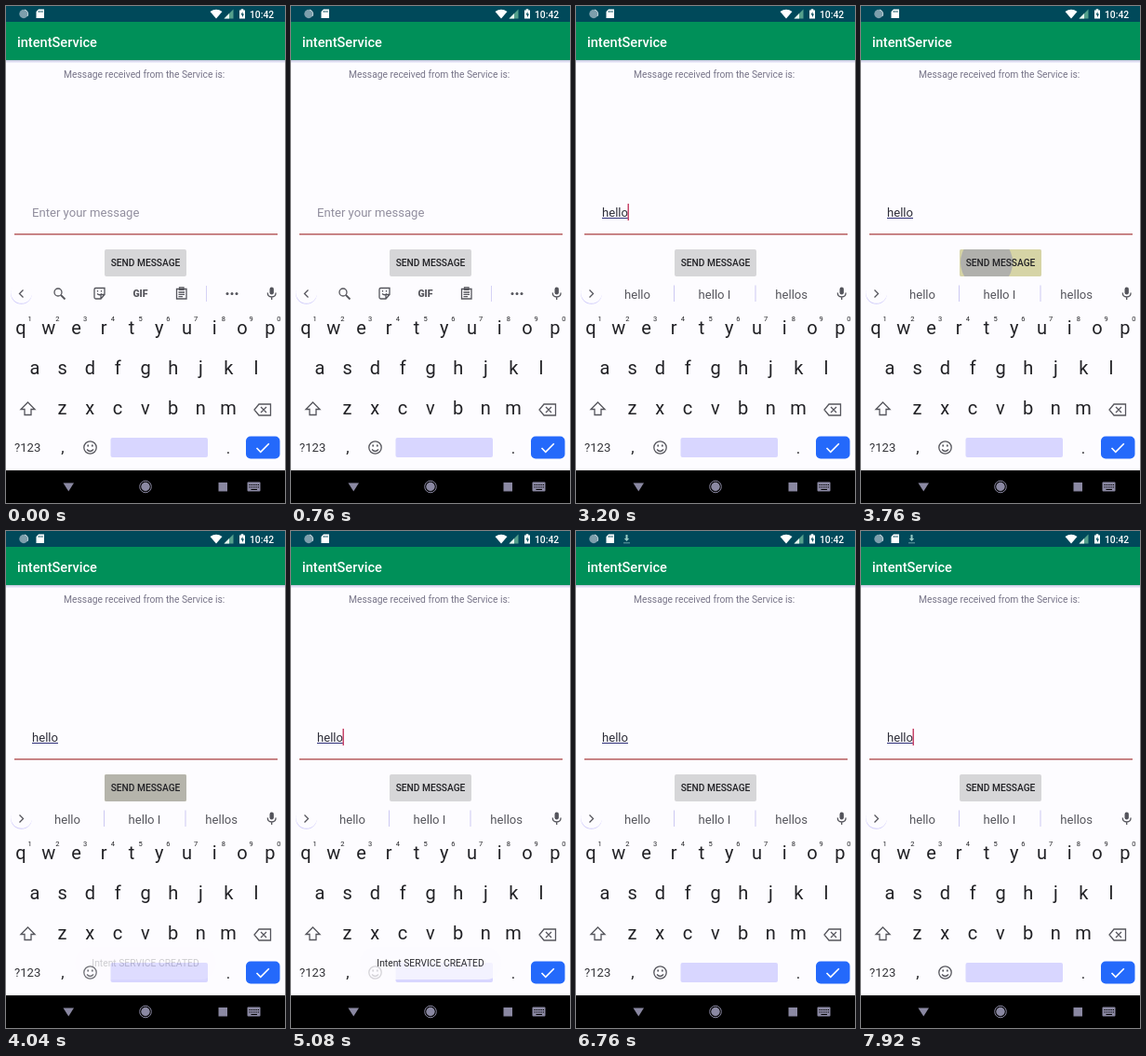
An HTML page that plays this animation: 300 px wide and 533 px high, repeating every 8000 ms.

```html
<!DOCTYPE html>
<html lang="en">
<head>
<meta charset="utf-8">
<title>Intent service demo</title>
<style>
html, body { margin: 0; width: 100%; height: 100%; overflow: hidden; background: #fdfcff; }
svg { display: block; width: 300px; height: 533px; font-family: Roboto, sans-serif; }
.mid { text-anchor: middle; }
.medium { font-weight: 500; }
.line { fill: none; stroke: #55555c; stroke-width: 1.3; }
.solid { fill: #55555c; }
.nav { fill: #8a88a2; }
</style>
</head>
<body>
<svg viewBox="0 0 300 533">
  <defs>
    <clipPath id="buttonClip"><rect x="106" y="261" width="88" height="29" rx="2"/></clipPath>
    <linearGradient id="shade" x2="0" y2="1">
      <stop stop-color="#c4c6de"/><stop offset="1" stop-color="#f4f3ff"/>
    </linearGradient>
  </defs>
  <rect width="300" height="533" fill="#fdfcff"/>

  <!-- status bar -->
  <rect width="300" height="17" fill="#00495a"/>
  <circle cx="19" cy="8.5" r="4.7" fill="#7d9fac"/>
  <path d="M20 4a4.7 4.7 0 0 1 3 7" fill="none" stroke="#c5d6dc"/>
  <path d="M35 3.500h6v9.500h-8.500v-7z" fill="#fff"/>
  <path d="M35.500 5v2m1.800-2v2m1.800-2v2" stroke="#00495a" stroke-width=".8"/>
  <path d="M219.500 6q6.500-4.500 13 0l-6.500 7.500z" fill="#fff"/>
  <path d="M244.500 3.500v10h-10z" fill="#55a08c"/>
  <path d="M240 8v5.500h-5.500z" fill="#e8f4f0"/>
  <path d="M251 4.500h1.700v-1.200h2.600v1.200h1.700v9h-6z" fill="#fff"/>
  <path d="M254.500 6l-2 3.500h1.500v2.700l2-3.700h-1.500z" fill="#00495a"/>
  <text x="262" y="13" font-size="10.3" fill="#fff" class="medium">10:42</text>
  <g id="download" fill="#a9d8d0">
    <path id="arrow" d="M53.500 3h2v4h1.700l-2.700 3-2.700-3h1.700z"/>
    <path d="M51 12.300h7v1h-7z" opacity=".7"/>
  </g>

  <!-- app -->
  <rect y="17" width="300" height="41" fill="#009059"/>
  <rect y="58" width="300" height="3" fill="url(#shade)"/>
  <text x="12" y="44" font-size="14.6" fill="#fff" class="medium">intentService</text>
  <text x="148.700" y="77" font-size="10.3" fill="#777488" class="mid">Message received from the Service is:</text>
  <text id="hint" x="28" y="226" font-size="13.1" fill="#918e9e">Enter your message</text>
  <text id="typed" x="28" y="226" font-size="13.1" fill="#2d2d38"></text>
  <rect id="under" x="28" y="227" height="1" fill="#30307a"/>
  <rect id="cursor" y="212" width="1.500" height="18" fill="#c8456a"/>
  <rect x="9" y="244" width="283" height="1.500" fill="#b85f60"/>
  <g clip-path="url(#buttonClip)">
    <rect x="106" y="261" width="88" height="29" fill="#d6d6d8"/>
    <rect id="press" x="106" y="261" width="88" height="29" fill="#d6d4a6"/>
    <circle id="ripple" cy="275" fill="#b0b0ac"/>
  </g>
  <text x="150" y="279" font-size="10.2" fill="#222226" class="mid medium">SEND MESSAGE</text>

  <!-- strip above the keys -->
  <circle cx="16.500" cy="308.500" r="11.300" fill="#d0ccfa"/>
  <circle cx="16.700" cy="307.300" r="11.500" fill="#fdfcff"/>
  <path id="chevron" class="line"/>
  <g id="tools">
    <g class="line">
      <circle cx="56" cy="307" r="4"/><path d="M59 310l4.500 4.500" stroke-width="1.800"/>
      <path d="M96.500 302.500h9.500v7l-4 4.500h-5.500a1.500 1.500 0 0 1-1.500-1.500v-8.500a1.500 1.500 0 0 1 1.500-1.500zM106 309.500h-4v4.500M98 308.500q2.500 2.500 5 0M98.500 305v1.500m4-1.500v1.500"/>
      <path d="M183.500 303.500h10.500v10.500h-10.500zM186.500 301.800h4.500v2.500h-4.500zM185.500 307h6.500m-6.500 2.300h6.500m-6.500 2.300h4.500"/>
    </g>
    <text x="144.500" y="312" font-size="10.500" font-weight="900" class="mid solid">GIF</text>
    <path d="M215.500 300v17" stroke="#d5d2f5"/>
    <g class="solid"><circle cx="238" cy="308.500" r="1.500"/><circle cx="243" cy="308.500" r="1.500"/><circle cx="248" cy="308.500" r="1.500"/></g>
  </g>
  <g id="words" font-size="13.1" class="mid" fill="#55555c">
    <path d="M105.500 299.500v17.500M193 299.500v17.500" stroke="#cdc9f2"/>
    <text x="66" y="313.500"></text><text x="149" y="313.500"></text><text x="231.700" y="313.500"></text>
  </g>
  <rect x="283.500" y="301.500" width="4.400" height="8" rx="2.200" class="solid"/>
  <path d="M281.300 307.500q0 4.500 4.400 4.500t4.400-4.500M285.700 312v3" class="line"/>

  <!-- keyboard -->
  <g id="keys" class="mid" fill="#222226"></g>
  <path d="M23.500 425l7.500 7.500h-4v6h-7v-6h-4z" class="line"/>
  <path d="M272 427h12.500v12h-12.500l-5-6zM274 430l6 6m0-6l-6 6" class="line"/>
  <text x="9" y="478" font-size="13.100" fill="#333338">?123</text>
  <g class="line">
    <circle cx="90.500" cy="473.500" r="6.700"/>
    <path d="M87 475.500q3.500 4 7 0"/>
    <path d="M88.200 470.500v2m4.600-2v2" stroke-width="1.700"/>
  </g>
  <rect x="112.500" y="463" width="104.500" height="21" rx="2" fill="#d8d6ff"/>
  <rect x="258" y="461.500" width="36.500" height="24" rx="5" fill="#2469fb"/>
  <path d="M269.500 474l4.300 4.300 9-9" fill="none" stroke="#fff" stroke-width="1.600"/>

  <g id="toast">
    <rect x="74" y="446" width="152" height="35" rx="16" fill="#fdfcff" fill-opacity=".76"/>
    <text x="150" y="467" font-size="10.300" fill="#2c2c30" class="mid">Intent SERVICE CREATED</text>
  </g>

  <!-- navigation bar -->
  <rect y="498" width="300" height="35" fill="#000"/>
  <g class="nav">
    <path d="M61.500 511.500h11.500l-5.750 9z"/>
    <circle cx="150" cy="515.500" r="4.700"/>
    <circle cx="150" cy="515.500" r="6.300" fill="none" stroke="#8a88a2"/>
    <rect x="228.500" y="511" width="9.500" height="9.500"/>
    <rect x="259.500" y="510.500" width="14" height="10" rx="1"/>
  </g>
  <path d="M261.500 513.500h10.500m-10.500 2.500h10.500" stroke="#000" stroke-width="1.200" stroke-dasharray="1.300 1"/>
  <path d="M263.500 518.500h6.500" stroke="#000"/>
</svg>
<script>
const LOOP = 8000;
const $ = id => document.getElementById(id);
const set = (id, attrs) => {
  for (const name in attrs) $(id).setAttribute(name, attrs[name]);
};
const clamp = x => Math.max(0, Math.min(1, x));
const ramp = (t, from, to) => clamp((t - from) / (to - from));
const latest = (list, t) => list.filter(item => item[0] <= t).pop()[1];

const typing = [[0, ''], [1200, 'h'], [1600, 'he'], [2360, 'hel'], [2720, 'hello']];
const suggestions = [
  [0, ''], [1320, 'h,hi,how'], [2160, 'he,hey,hello'], [2520, 'hel,hello,help'],
  [2720, "hell,hello,he'll"], [3200, 'hello,hello I,hellos']
];
const cursorOff = [[0, 1200], [3560, 5080], [5440, 5960], [6480, 6880], [7480, 7920]];

function addKey(char, x, y, size = 20) {
  const key = document.createElementNS('http://www.w3.org/2000/svg', 'text');
  key.textContent = char;
  key.setAttribute('x', x);
  key.setAttribute('y', y);
  key.setAttribute('font-size', size);
  $('keys').append(key);
}
[['qwertyuiop', 16, 352], ['asdfghjkl', 31, 395], ['zxcvbnm', 60.500, 438]].forEach(([row, x, y]) =>
  [...row].forEach((char, i) => addKey(char, x + i * 29.75, y)));
[...'1234567890'].forEach((digit, i) => addKey(digit, 25.500 + i * 29.75, 337.500, 7.500));
addKey(',', 61, 479, 17);
addKey('.', 239, 480, 17);

function draw(t) {
  const text = latest(typing, t);
  $('typed').textContent = text;
  const width = text ? $('typed').getComputedTextLength() : 0;
  set('hint', { opacity: text ? 0 : 1 });
  set('under', { width });
  set('cursor', {
    x: 27.500 + width,
    opacity: cursorOff.some(([from, to]) => t >= from && t < to) ? 0 : 1
  });

  const words = latest(suggestions, t).split(',');
  const open = words.length > 1;
  set('tools', { opacity: open ? 0 : 1 });
  set('words', { opacity: open ? 1 : 0 });
  set('chevron', { d: open ? 'M14.500 304.500l4 4-4 4' : 'M18.500 304.500l-4 4 4 4' });
  $('words').querySelectorAll('text').forEach((label, i) => label.textContent = words[i] || '');

  const fade = 1 - ramp(t, 4000, 4320);
  set('press', { opacity: ramp(t, 3560, 3720) * fade });
  set('ripple', {
    cx: 135 + 15 * ramp(t, 3760, 4000),
    r: Math.max(0, t - 3560) * 0.14,
    opacity: fade
  });
  set('toast', { opacity: ramp(t, 3960, 4320) * (1 - ramp(t, 5720, 6160)) });

  const step = Math.floor((t - 5240) / 200);
  set('download', { opacity: step < 0 ? 0 : step % 2 ? 0.9 : 0.65 });
  set('arrow', { transform: `translate(0 ${Math.max(0, step) % 3})` });
}

const start = performance.now();
function frame() {
  draw((performance.now() - start) % LOOP);
  requestAnimationFrame(frame);
}
frame();
</script>
</body>
</html>
```
